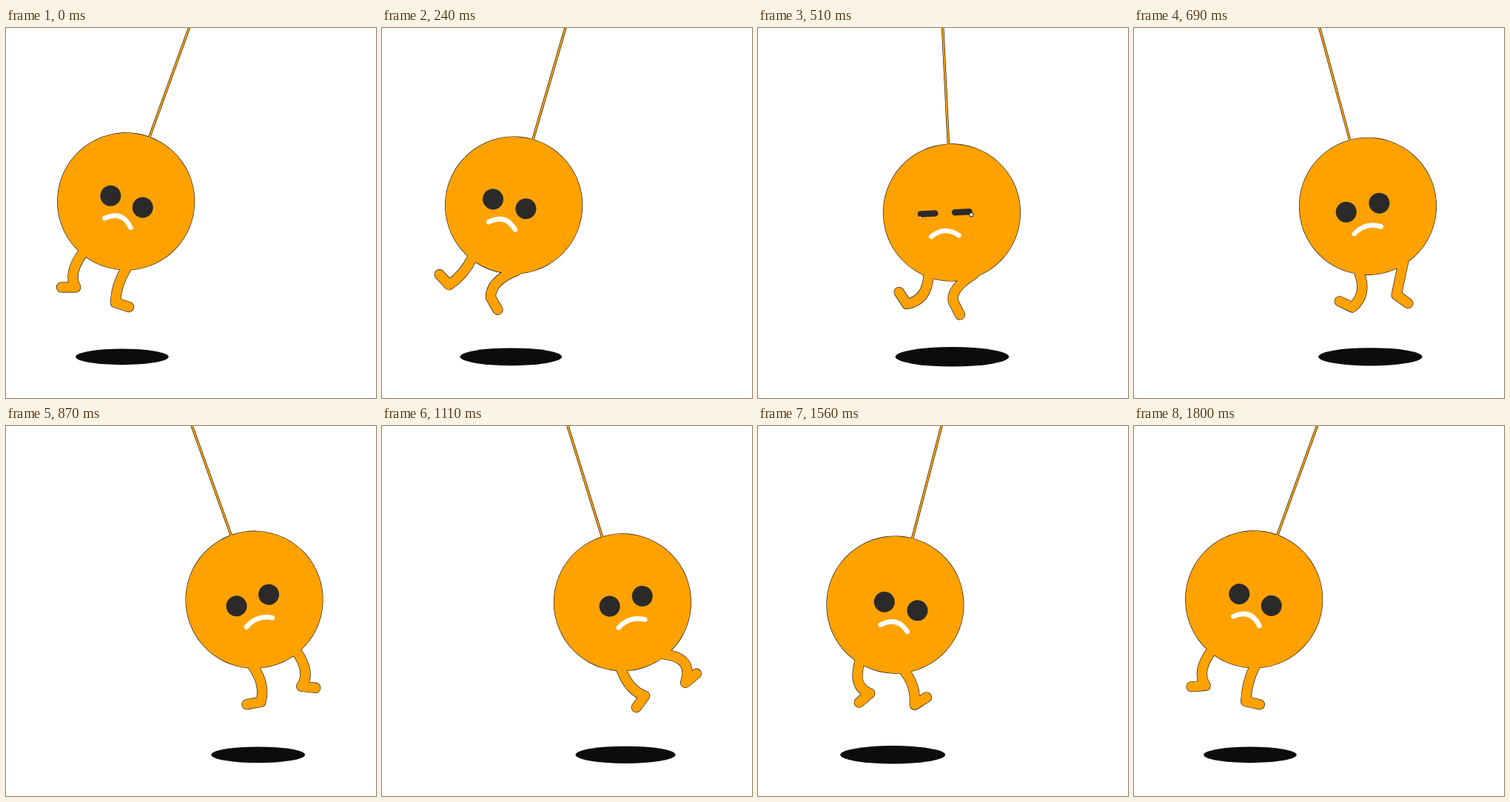
Recreate the animation shown at these times as an HTML page with a canvas. Size 500 px wide and 500 px high, loop 1.83 s.

```html
<!DOCTYPE html>
<html lang="en">
<head>
<meta charset="utf-8">
<title>Swinging ball</title>
<style>
html, body { margin: 0; height: 100%; overflow: hidden; background: #fff; }
canvas { display: block; }
</style>
</head>
<body>
<canvas id="stage" width="500" height="500"></canvas>
<script>
const ctx = document.getElementById('stage').getContext('2d');
const LOOP = 1830, STEP = 30, HALF = LOOP / 2, RAD = Math.PI / 180;
const ORANGE = '#ffa200', DARK = '#0c0c0c', EYE = '#2b2a29';
const PIVOT_X = 249.4, PIVOT_Y = -5.3, ROPE = 255, RADIUS = 92.5;
const AMP = 20, FOOT = 19.2;

// Leg poses in body space; the right foot mirrors the left, half a loop apart
const TIMES = [0, 240, 510, 870, 1110, 1380];
const LEFT_KNEE = [[-41.2, 118], [-38.1, 108.8], [-39.3, 116.8], [-24.1, 112.5], [-27.2, 116.5], [-21.9, 123.6]];
const RIGHT_KNEE = [[25.8, 109.5], [-1.2, 106.1], [-7.9, 103.3], [39.4, 119.2], [70, 100.2], [70, 93.2]];
// Heel x, y and foot angle
const HEEL = [
  [-24.2, 132.3, 160], [-53.8, 127.8, 210.7], [-66.7, 120.5, 239.4],
  [-38.3, 133, 189.6], [-8.5, 129.7, 143.4], [4.9, 120.4, 112.4]
];

const clamp = x => Math.max(0, Math.min(1, x));

// Strong ease in and out: cubic bezier (.5, 0, .5, 1)
function ease(p) {
  let lo = 0, hi = 1;
  for (let i = 0; i < 20; i++) {
    const s = (lo + hi) / 2;
    if (1.5 * s * (1 - s) + s ** 3 < p) lo = s; else hi = s;
  }
  return lo * lo * (3 - 2 * lo);
}

function swing(t) {
  const go = ease(clamp((t - 25) / 906));
  const back = ease(clamp((t - 929) / 876));
  return AMP * (1 - 2 * go + 2 * back);
}

const slide = t => -9.3 * Math.sin(2 * Math.PI * (t - 30) / LOOP);

// Smooth periodic interpolation through a list of poses
function track(poses, t) {
  t %= LOOP;
  const n = TIMES.length;
  let i = n - 1;
  while (TIMES[i] > t) i--;
  const [a, b, c, d] = [-1, 0, 1, 2].map(k => {
    const turn = Math.floor((i + k) / n), j = i + k - turn * n;
    return { time: TIMES[j] + turn * LOOP, pose: poses[j] };
  });
  const span = c.time - b.time, s = (t - b.time) / span;
  return b.pose.map((from, k) => {
    const to = c.pose[k];
    const m0 = (to - a.pose[k]) / (c.time - a.time) * span;
    const m1 = (d.pose[k] - from) / (d.time - b.time) * span;
    return from + (to - from) * s * s * (3 - 2 * s)
      + m0 * s * (1 - s) ** 2 - m1 * s * s * (1 - s);
  });
}

function legPath(t, side, knees) {
  const [x, y, angle] = track(HEEL, side < 0 ? t : t + HALF);
  const path = new Path2D();
  path.moveTo(side * 31 + slide(t) / 2, 84);
  path.quadraticCurveTo(...track(knees, t), -side * x, y);
  path.lineTo(-side * (x + FOOT * Math.cos(angle * RAD)), y + FOOT * Math.sin(angle * RAD));
  return path;
}

function disc(x, y, rx, ry, color) {
  ctx.fillStyle = color;
  ctx.beginPath();
  ctx.ellipse(x, y, rx, ry, 0, 0, 7);
  ctx.fill();
}

function line(path, width, color) {
  ctx.lineWidth = width;
  ctx.strokeStyle = color;
  ctx.stroke(path);
}

function drawFace(t, tilt) {
  const shut = clamp((t - 420) / 80) * clamp((630 - t) / 80);
  const h = 28 - 19.5 * shut;
  ctx.translate(slide(t), 0);
  ctx.fillStyle = EYE;
  for (const x of [-23.1, 23.1]) {
    ctx.beginPath();
    ctx.roundRect(x - 14, -h / 2, 28, h, h / 2);
    ctx.fill();
  }
  if (shut === 1) {
    disc(35.5, 4.2, 3, 3, DARK);
    disc(35.5, 4.2, 2.3, 2.3, '#fff');
    disc(-33.5, 4.2, 1, 1, '#fff');
  }
  const depth = 7.3 + 1.9 * tilt / AMP;
  line(new Path2D(`M-20.2 31.2Q-1.5 ${31.2 - 2 * depth} 17.1 31.2`), 6.5, '#fff');
}

function draw(t) {
  const tilt = swing(t);
  ctx.setTransform(1, 0, 0, 1, 0, 0);
  ctx.fillStyle = '#fff';
  ctx.fillRect(0, 0, 500, 500);

  const rx = 76.8 - 14 * Math.abs(tilt / AMP) ** 2.7;
  disc(PIVOT_X - 92.5 * tilt / AMP, 444.3, rx, rx / 5.8, DARK);

  ctx.translate(PIVOT_X, PIVOT_Y);
  ctx.rotate(tilt * RAD);
  ctx.translate(0, ROPE);
  ctx.lineCap = ctx.lineJoin = 'round';
  const rope = new Path2D(`M0 ${-ROPE}V0`);
  const legs = [legPath(t, -1, LEFT_KNEE), legPath(t, 1, RIGHT_KNEE)];

  // Dark pass first, so only the joint silhouette keeps an outline
  for (const [edge, color] of [[0.6, DARK], [0, ORANGE]]) {
    line(rope, 2.2 + 2 * edge, color);
    for (const leg of legs) line(leg, 13 + 2 * edge, color);
    disc(0, 0, RADIUS + edge, RADIUS + edge, color);
  }
  drawFace(t, tilt);
}

const start = performance.now();
function tick() {
  const t = (performance.now() - start) % LOOP;
  draw(Math.floor(t / STEP) * STEP);
  requestAnimationFrame(tick);
}
tick();
</script>
</body>
</html>
```
